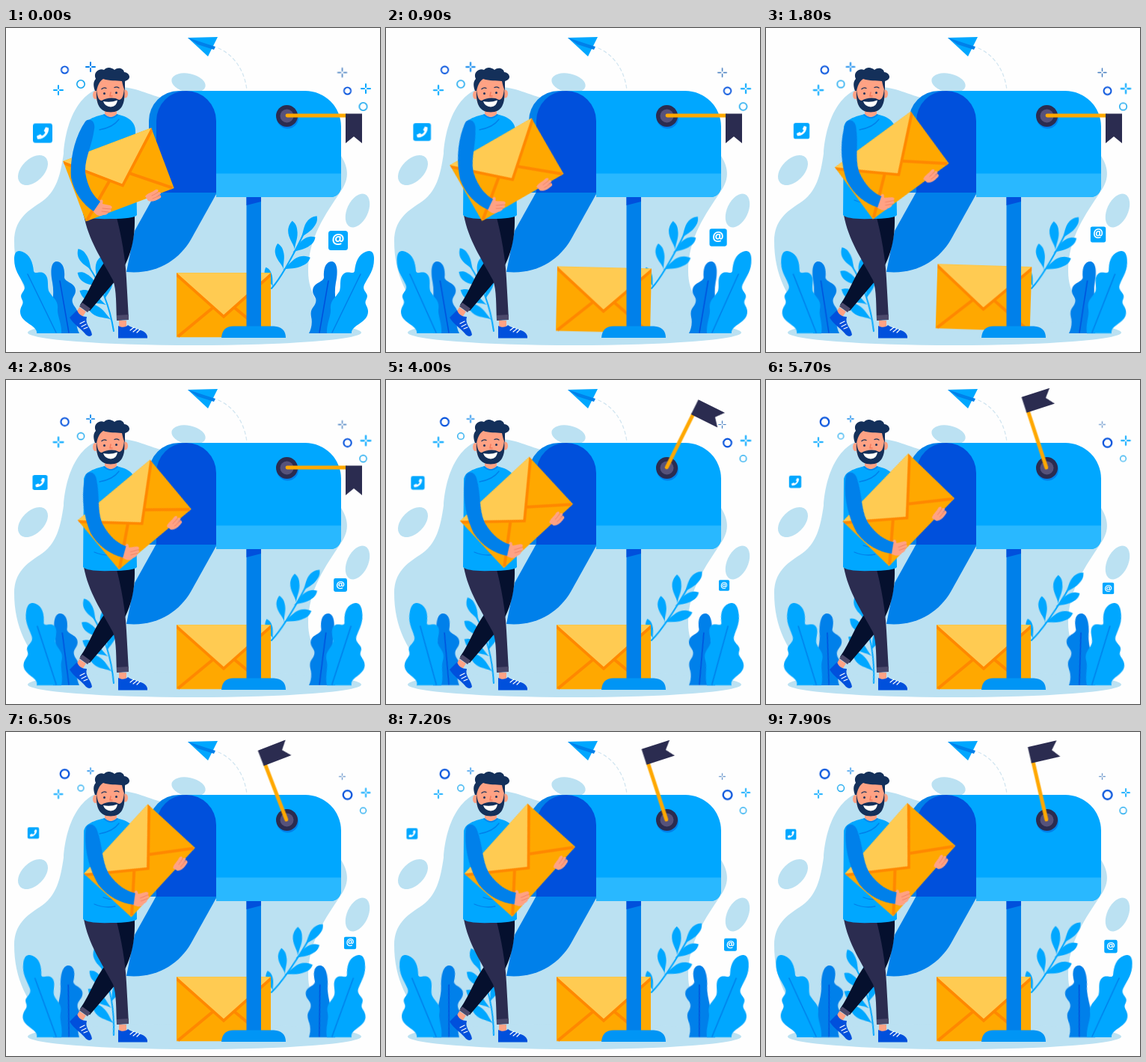
An HTML page that plays this animation: 500x433 px, repeating every 8000 ms.

```html
<!DOCTYPE html>
<html lang="en">
<head>
<meta charset="utf-8">
<title>Mailbox</title>
<style>
html, body { margin: 0; width: 100%; height: 100%; overflow: hidden; background: #fefefe; }
svg { display: block; width: 100vw; height: 100vh; }
:root { --sky: #00a7ff; --mid: #0080ea; --deep: #0050dc; --pale: #bbe1f2; --navy: #2b2c50; --skin: #ffa284; }
.sky { fill: var(--sky); } .mid { fill: var(--mid); } .deep { fill: var(--deep); }
.pale { fill: var(--pale); } .navy { fill: var(--navy); } .skin { fill: var(--skin); }
.line { fill: none; stroke-linecap: round; stroke-linejoin: round; }
.move { animation: 8s linear infinite; }

.carry { transform-origin: 114px 125px; animation-name: carry; }
@keyframes carry {
  0% { transform: rotate(0deg); }
  6% { transform: rotate(-5.3deg); }
  12.5% { transform: rotate(-10.2deg); }
  22.5% { transform: rotate(-15.6deg); }
  35% { transform: rotate(-19.2deg); }
  50% { transform: rotate(-22.1deg); }
  71.25% { transform: rotate(-25.3deg); }
  81.25% { transform: rotate(-26.7deg); }
  100% { transform: rotate(-27.9deg); }
}
.flag { transform-origin: 375.5px 117.5px; animation-name: flag; }
@keyframes flag {
  0%, 35% { transform: rotate(0deg); }
  42.5% { transform: rotate(-33deg); }
  50% { transform: rotate(-63.5deg); }
  56.25% { transform: rotate(-84deg); }
  62.5% { transform: rotate(-97deg); }
  71.25% { transform: rotate(-108deg); }
  77% { transform: rotate(-111deg); }
  81.25% { transform: rotate(-111deg); }
  90% { transform: rotate(-108deg); }
  98.75%, 100% { transform: rotate(-103deg); }
}
.hop { transform-origin: 291px 371px; animation-name: hop; }
@keyframes hop {
  0%, 36%, 100% { transform: none; animation-timing-function: cubic-bezier(.37,0,.63,1); }
  19% { transform: translateY(-11px) rotate(2deg); animation-timing-function: cubic-bezier(.37,0,.63,1); }
}
.tall { transform-origin: 60px 408px; animation-name: tall; }
@keyframes tall {
  0% { transform: skewX(0deg); }
  11% { transform: skewX(-2deg); }
  22.5% { transform: skewX(-5.4deg); }
  35% { transform: skewX(-9.2deg); }
  50% { transform: skewX(-12deg); }
  56% { transform: skewX(-12.2deg); }
  71.25% { transform: skewX(-10.2deg); }
  81.25% { transform: skewX(-7deg); }
  98.75%, 100% { transform: skewX(-1.4deg); }
}
.small { transform-origin: 80px 408px; animation-name: small; animation-timing-function: cubic-bezier(.37,0,.63,1); }
@keyframes small { to { transform: skewX(-10deg); } }
.twigL { transform-origin: 144px 405px; animation-name: twigL; }
@keyframes twigL {
  0% { transform: rotate(0deg); }
  22.5% { transform: rotate(2.6deg); }
  35% { transform: rotate(4deg); }
  50% { transform: rotate(6.4deg); }
  71.25% { transform: rotate(11.6deg); }
  81.25% { transform: rotate(11.2deg); }
  100% { transform: rotate(6deg); }
}
.twigR { transform-origin: 356px 346px; animation-name: twigR; }
@keyframes twigR {
  0% { transform: rotate(0deg); }
  22.5% { transform: rotate(1.4deg); }
  35% { transform: rotate(2.2deg); }
  50% { transform: rotate(4.2deg); }
  71.25% { transform: rotate(5.4deg); }
  81.25% { transform: rotate(5deg); }
  100% { transform: rotate(2.8deg); }
}
.phone { animation-name: phone; }
@keyframes phone {
  0% { transform: translate(49px,140.5px) scale(1); }
  22.5% { transform: translate(47.5px,137.5px) scale(.82); }
  35% { transform: translate(45.5px,137px) scale(.77); }
  50% { transform: translate(42.5px,137.5px) scale(.7); }
  71.25% { transform: translate(39px,136px) scale(.63); }
  81.25% { transform: translate(36.5px,135px) scale(.59); }
  100% { transform: translate(33px,137px) scale(.55); }
}
.at { animation-name: at; }
@keyframes at {
  0% { transform: translate(444px,284px) scale(1); }
  22.5% { transform: translate(444px,276px) scale(.8); }
  35% { transform: translate(447px,274px) scale(.69); }
  50% { transform: translate(452px,274.5px) scale(.55); }
  71.25% { transform: translate(457.5px,278.5px) scale(.6); }
  81.25% { transform: translate(460px,282px) scale(.63); }
  100% { transform: translate(461px,287px) scale(.68); }
}
.grow { animation-name: grow; }
@keyframes grow { 70% { transform: scale(1.24); } 100% { transform: scale(1.3); } }
.dip { animation-name: dip; }
@keyframes dip { 50% { transform: scale(.82); } 75% { transform: scale(.72); } 100% { transform: scale(.86); } }
.fade { animation-name: fade; }
@keyframes fade { 22.5% { transform: scale(.92); } 70% { transform: scale(.68); } 100% { transform: scale(.66); } }
.swell { animation-name: swell; }
@keyframes swell { 35% { transform: scale(1.08); } 55% { transform: scale(1.05); } 100% { transform: scale(.84); } }
</style>
</head>
<body>
<svg viewBox="0 0 500 433" preserveAspectRatio="none">
<defs>
  <g id="envelope">
    <path fill="#ffa800" d="M-63-43H63V43H-63Z"/>
    <path fill="#ffcb52" d="M-63-43H63L0 14Z"/>
    <path fill="none" stroke="#ff8800" stroke-width="4" d="M-15 4L-61 42M15 4L61 42"/>
    <path fill="#ff8800" d="M-63-43L0 13L63-43V-38L0 18L-63-38Z"/>
  </g>
  <path id="leaf" d="M0 0C8-1 14-7 24-6C30-5 33-2 35 0C33 2 30 5 24 5C14 6 8 1 0 0Z"/>
  <path id="spark" class="line" d="M0-6V-2M0 2V6M-6 0H-2M2 0H6"/>
  <g id="smallPlant">
    <path class="mid" d="M63 408C58 380 66 360 62 340C59 326 60 313 67 312C76 312 79 322 78 333C78 340 93 340 93 351C93 358 87 360 89 367C91 374 97 374 95 386C93 394 95 402 98 408Z"/>
    <path class="line" stroke="#0050dc" stroke-width="1.5" d="M72 338L84 407"/>
  </g>
  <g id="tallPlant">
    <path class="sky" d="M41 408C43 397 18 394 19 378C20 370 25 369 21 362C17 354 28 352 24 343C18 331 11 324 11 309C11 299 15 296 22 299C32 303 36 313 37 325C39 330 45 324 51 328C59 334 54 346 58 353C63 361 70 364 69 375C68 384 75 396 74 408Z"/>
    <path class="line" stroke="#0080ea" stroke-width="1.5" d="M29 329L67 407"/>
  </g>
</defs>

<path class="pale" d="M11 285C11 257 28 245 45 234C68 220 73 195 77 168C80 125 98 78 142 78C175 78 190 90 215 95L446 168C457 184 461 200 447 219C428 248 404 280 404 325C404 355 420 372 440 400H62C28 362 11 330 11 285Z"/>
<ellipse class="pale" cx="252" cy="407" rx="223" ry="17"/>
<ellipse class="pale" rx="24" ry="15" transform="translate(36 190) rotate(-45)"/>
<ellipse class="pale" rx="23" ry="12.5" transform="translate(244 73.500) rotate(12)"/>
<ellipse class="pale" rx="24" ry="14" transform="translate(470 244) rotate(-65)"/>

<path class="line" stroke="#d3e6f1" stroke-width="1.3" stroke-dasharray="4 4" d="M284 27C305 36 319 57 322 83"/>
<path class="sky" d="M243 13L283 12L270 38Z"/>
<path class="mid" d="M243 13L280 25L278 29L256 22Z"/>

<g>
  <g class="move small"><use href="#smallPlant"/></g>
  <g class="move tall"><use href="#tallPlant"/></g>
</g>
<g transform="translate(503 0) scale(-1 1)">
  <g class="move small"><use href="#smallPlant"/></g>
  <g class="move tall"><use href="#tallPlant"/></g>
</g>

<g class="move twigL sky">
  <path class="line" stroke="#00a7ff" stroke-width="2" d="M144 405C140 380 132 350 110 318"/>
  <use href="#leaf" transform="translate(115 325) rotate(-122)"/>
  <use href="#leaf" transform="translate(121 338) rotate(-76)"/>
  <use href="#leaf" transform="translate(125 346) rotate(-147)"/>
  <use href="#leaf" transform="translate(132 363) rotate(-76)"/>
  <use href="#leaf" transform="translate(134 370) rotate(-152) scale(1.150)"/>
  <use href="#leaf" transform="translate(141 390) rotate(-148) scale(1.100)"/>
</g>

<g class="move twigR sky">
  <path class="line" stroke="#00a7ff" stroke-width="2" d="M355 348C366 336 380 312 400 271"/>
  <use href="#leaf" transform="translate(394 281) rotate(-54) scale(1.050)"/>
  <use href="#leaf" transform="translate(386 296) rotate(-95) scale(1.100)"/>
  <use href="#leaf" transform="translate(383 300) rotate(-34) scale(1.050)"/>
  <use href="#leaf" transform="translate(371 322) rotate(-103)"/>
  <use href="#leaf" transform="translate(370 323) rotate(-24) scale(1.150)"/>
  <use href="#leaf" transform="translate(357 346) rotate(-110) scale(.8)"/>
</g>

<g class="move hop"><use href="#envelope" x="291" y="370.200"/></g>

<path class="mid" d="M201 219H281V222L247 283C232 309 202 330 161 326L172 271Z"/>
<path class="mid" d="M191 220V124A40 40 0 0 1 231 84H250V220Z"/>
<path class="sky" d="M241 84H400A48 48 0 0 1 448 132V212A14 14 0 0 1 434 226H281V124Z"/>
<path fill="#29b8ff" d="M281 194.500H448V212A14 14 0 0 1 434 226H281Z"/>
<path class="deep" d="M201 220V124A40 40 0 0 1 281 124V220Z"/>
<path class="mid" d="M321.500 226H341V402H321.500Z"/>
<path class="deep" d="M321.500 226H341V232L321.500 237Z"/>
<path fill="#0095f5" d="M288 414C289 403 294 399 304 398.500H358C368 399 374 404 374 414Z"/>
<circle class="mid" cx="376.500" cy="120" r="14.500"/>
<circle class="navy" cx="375.500" cy="117.500" r="14.500"/>
<circle fill="#56527a" cx="375.500" cy="117.500" r="9"/>
<g class="move flag">
  <path class="line" stroke="#ffa800" stroke-width="4.800" d="M376 117H455"/>
  <path class="navy" d="M454 114.500H476V154L465 145L454 154Z"/>
</g>

<g id="legs">
  <path fill="#05102e" d="M142 252H172C173 288 164 314 146 338L112 378L99 370C113 350 119 328 134 310Z"/>
  <path class="navy" d="M104 250H147C154 275 160 310 161 335L164 389L148 391C147 372 148 350 143 337C128 309 110 283 104 250Z"/>
  <path fill="#4b496b" d="M148 384L164 383V390L148 391ZM102 367L113 375L109 380L98 372Z"/>
  <path class="skin" d="M151 391H161V401H151ZM98 373L107 379L101 388L93 382Z"/>
  <path class="deep" d="M150 398C155 401 160 400 163 397C170 403 187 402 189 412V414.500H150ZM95 377C97 383 102 386 108 386C105 396 114 401 115 410Q112 414 107 410C101 402 91 397 85 387Z"/>
  <path class="line" stroke="#fff" stroke-width="1.200" d="M166 404L171 400M170 406L175 402M175 407L179 403M99 395L105 392M101 399L107 396M104 402L109 400"/>
</g>

<g id="torso">
  <path class="skin" d="M132 104H148V118Q140 124 132 118Z"/>
  <path class="sky" d="M121 118L132 115Q140 123 148 115L158 118C167 122 172 127 173 136L175 250Q171 255 140 255Q109 256 103 250L104 132C106 124 113 121 121 118Z"/>
  <path class="line" stroke="#0080ea" stroke-width="1.300" d="M131 116Q140 124 149 116M125 136Q143 133 151 122M118 230Q132 236 146 233M130 221Q140 225 148 223"/>
</g>

<g id="head">
  <ellipse class="skin" cx="119.500" cy="89.500" rx="3.500" ry="5.500"/>
  <ellipse class="skin" cx="159.500" cy="88" rx="3.500" ry="5.500"/>
  <path class="skin" d="M121 66H158V92C158 118 121 118 121 92Z"/>
  <path fill="#14305a" d="M121 82C122 92 124 97 128 97C134 93 145 92 151 96C155 96 157 91 158 81C160 101 155 112.500 140 112.500C124 112.500 120 100 121 82Z"/>
  <path fill="#fff" d="M130 98Q140 100 149 96.500Q148 105 140 105.500Q132 105 130 98Z"/>
  <path fill="#14305a" d="M119 84C116 76 117 71 120 68C116 60 124 53 131 56C135 51 142 53 145 56C150 52 157 54 158 59C165 60 167 66 163 69C161 71 159 70 159 72L159 84C157 80 156 76 155 71C148 70 138 71 130 68C125 71 123 76 121 84Z"/>
  <path class="line" stroke="#14305a" stroke-width="1.300" d="M128 81.500Q131 79 134 80.500M145 79.500Q148 78 151 80"/>
  <circle fill="#14305a" cx="131.500" cy="87.500" r="1.500"/>
  <circle fill="#14305a" cx="147.500" cy="86.500" r="1.500"/>
  <path class="line" stroke="#f27a5c" stroke-width="1.500" d="M140 86L139 91H142"/>
</g>

<g class="move carry">
  <use href="#envelope" transform="translate(150.500 196) rotate(-20.700)"/>
  <path class="skin" d="M186 225C190 220 195 220 200 216Q205 215 203 219L199 221L205 219Q209 221 205 223L200 225L206 223Q209 226 205 228C200 231 195 233 190 231Z"/>
  <path class="line" stroke="#f07f62" stroke-width=".8" d="M195 224L203 220M196 228L206 224"/>
  <path class="skin" d="M116 238C119 232 122 236 126 230Q131 228 129 235L139 237Q144 239 140 242Q142 246 137 246Q136 250 130 250C124 253 120 250 115 243Z"/>
  <path class="line" stroke="#f07f62" stroke-width=".9" d="M129 241L140 242M128 245L137 246"/>
  <path class="mid" d="M106 125C112 119 120 125 118 135C115 158 105 174 106 193C109 213 117 225 126 232L117 245C103 236 91 220 87 200C85 176 92 145 106 125Z"/>
</g>

<g stroke-width="2">
  <g transform="translate(78.500 56)"><circle class="line move grow" r="4.600" stroke="#0050dc" stroke-width="1.800"/></g>
  <g transform="translate(100 75)"><circle class="line move dip" r="5.200" stroke="#12a5ee" stroke-width="1.600"/></g>
  <g transform="translate(456.500 84)"><circle class="line move grow" r="4.600" stroke="#0050dc" stroke-width="1.800"/></g>
  <g transform="translate(477.500 105)"><circle class="line move dip" r="5.200" stroke="#12a5ee" stroke-width="1.600"/></g>
  <g transform="translate(113 52)"><g class="move fade"><use href="#spark" stroke="#0080ea"/></g></g>
  <g transform="translate(70 83)"><g class="move swell"><use href="#spark" stroke="#00a7ff"/></g></g>
  <g transform="translate(449.500 59.500)"><g class="move fade"><use href="#spark" stroke="#3d78bd" stroke-width="1.500"/></g></g>
  <g transform="translate(481 81)"><g class="move swell"><use href="#spark" stroke="#00a7ff"/></g></g>
</g>

<g class="move phone">
  <rect class="sky" x="-13" y="-13" width="26" height="26" rx="3.500"/>
  <path fill="#fff" d="M4-8L8-7C9 1 1 9-7 8L-8 4L-3 1.500L-1 3.500C1 2.500 2.500 1 3.500-1L1.500-3Z"/>
</g>
<g class="move at">
  <rect class="sky" x="-13" y="-13" width="26" height="26" rx="3.500"/>
  <text y="5.500" fill="#fff" font-size="19" font-weight="700" text-anchor="middle" font-family="'Open Sans', 'Noto Sans', sans-serif">@</text>
</g>
</svg>
</body>
</html>
```
